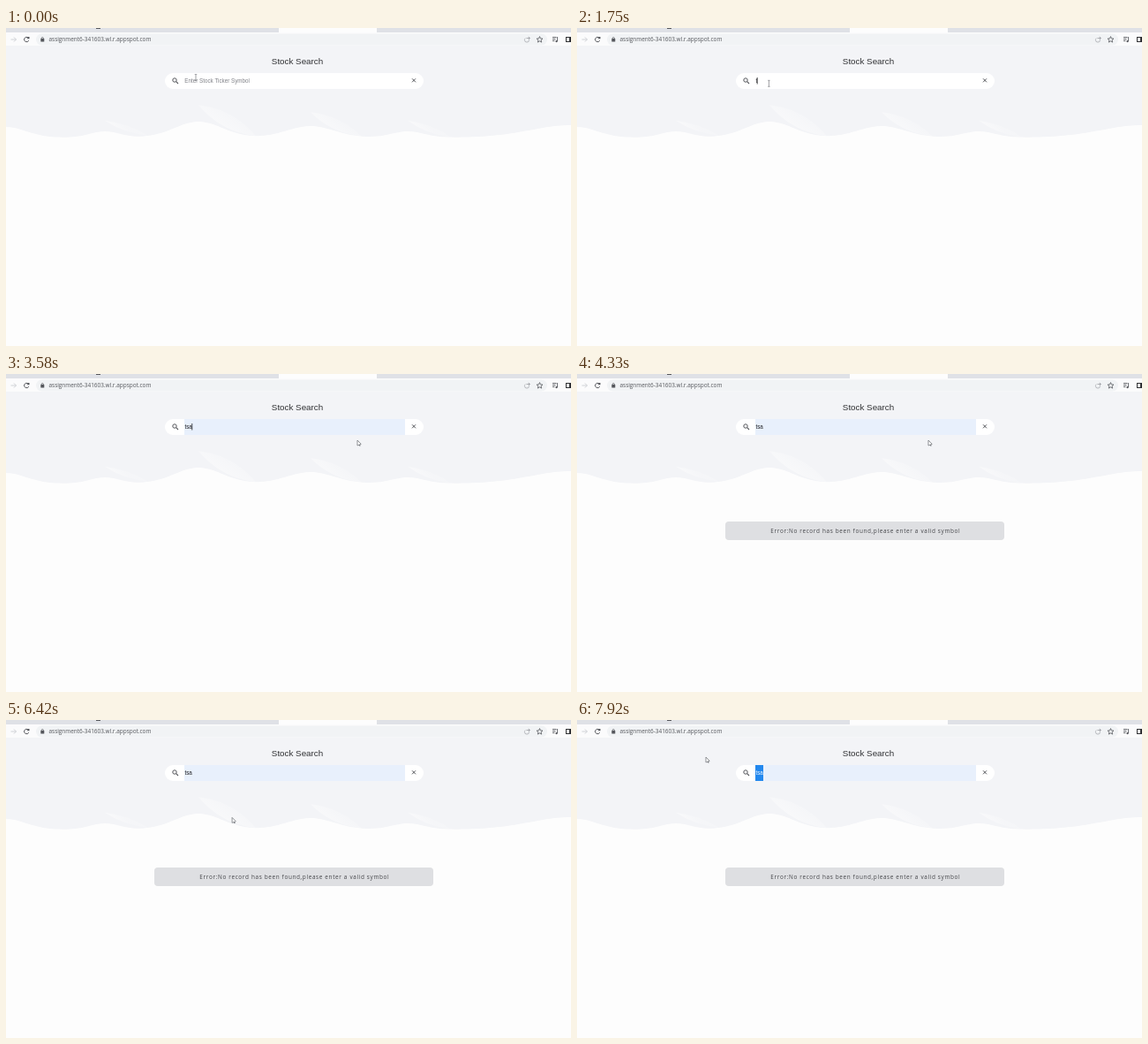
Animation of 640x360 px, one loop 8000 ms. Source, as an HTML page with a canvas:

```html
<!DOCTYPE html>
<html lang="en">
<head>
<meta charset="utf-8">
<title>Stock Search</title>
<style>
  html, body { margin: 0; width: 100%; height: 100%; overflow: hidden; background: #fdfdfd; }
  canvas { display: block; width: 640px; height: 360px; }
</style>
</head>
<body>
<canvas id="stage" width="640" height="360"></canvas>
<script>
const ctx = document.getElementById('stage').getContext('2d');
const LOOP = 8000;
const STEP = 250 / 3;
const ARIAL = '"Liberation Sans", Arial, sans-serif';
const HUMAN = '"Open Sans", "Noto Sans", sans-serif';
const PAGE = '#fdfdfd', HEADER = '#f3f4f7', INK = '#2f3033', GREY = '#55575c', FAINT = '#a9abb0';
const FIELD = { x: 202, y: 51, w: 250, h: 18 };

// Moments of the story, in ms
const TYPED = 1570, PICKED = 2240, FAILED = 4325, DRAGGED = 7420;

// The pointer rests between these moves
const MOVES = [
  { from: 80, to: 420, x: 218, y: 58 },
  { from: 1580, to: 2170, x: 215, y: 82 },
  { from: 2670, to: 3580, x: 398, y: 75 },
  { from: 4330, to: 5670, x: 272, y: 164 },
  { from: 5670, to: 7170, x: 240, y: 56 },
  { from: 7170, to: 7920, x: 146, y: 42 }
];

// Crests of the header wave
const CRESTS = [
  { x: 0, rise: 12, spread: 32 },
  { x: 112, rise: 7, spread: 24 },
  { x: 218, rise: 18, spread: 38 },
  { x: 345, rise: 13, spread: 38 },
  { x: 455, rise: 7, spread: 26 },
  { x: 640, rise: 14, spread: 65 }
];

function box(x, y, w, h, r, fill) {
  ctx.fillStyle = fill;
  ctx.beginPath();
  ctx.roundRect(x, y, w, h, r);
  ctx.fill();
}

function text(str, x, y, size, family, color, align = 'left', spacing = 0) {
  ctx.font = `${size}px ${family}`;
  ctx.letterSpacing = spacing + 'px';
  ctx.textAlign = align;
  ctx.fillStyle = color;
  ctx.fillText(str, x, y);
}

function line(x0, y0, x1, y1, color, width = 1) {
  ctx.strokeStyle = color;
  ctx.lineWidth = width;
  ctx.beginPath();
  ctx.moveTo(x0, y0);
  ctx.lineTo(x1, y1);
  ctx.stroke();
}

function ring(x, y, r, color, width = 1, from = 0, to = Math.PI * 2) {
  ctx.strokeStyle = color;
  ctx.lineWidth = width;
  ctx.beginPath();
  ctx.arc(x, y, r, from, to);
  ctx.stroke();
}

// Right-pointing arrow with its tip at x, y
function arrow(x, y, length, size, color) {
  line(x - length, y, x, y, color);
  line(x - size, y - size, x, y, color);
  line(x - size, y + size, x, y, color);
}

function star(x, y, r, color) {
  ctx.beginPath();
  for (let i = 0; i < 10; i++) {
    const d = i % 2 ? r * 0.45 : r, a = i * Math.PI / 5 - Math.PI / 2;
    ctx.lineTo(x + d * Math.cos(a), y + d * Math.sin(a));
  }
  ctx.closePath();
  ctx.strokeStyle = color;
  ctx.lineWidth = 0.8;
  ctx.stroke();
}

function edge(x) {
  return CRESTS.reduce((y, c) => y - c.rise * Math.exp(-(((x - c.x) / c.spread) ** 2)), 124);
}

function fold({ x, rise }) {
  const w = 38 + rise * 1.5, top = edge(x) - 8 - rise * 0.6, foot = edge(x + w);
  const g = ctx.createLinearGradient(x, foot, x + w * 0.35, top);
  g.addColorStop(0, 'rgba(253,253,253,0.9)');
  g.addColorStop(1, 'rgba(253,253,253,0.2)');
  ctx.fillStyle = g;
  ctx.beginPath();
  ctx.moveTo(x, top);
  ctx.quadraticCurveTo(x + w * 0.6, top + 4, x + w, foot);
  ctx.quadraticCurveTo(x + w * 0.4, foot - 4, x, top);
  ctx.fill();
}

function drawHeader() {
  ctx.fillStyle = HEADER;
  ctx.beginPath();
  ctx.moveTo(0, 0);
  for (let x = 0; x <= 640; x += 4) ctx.lineTo(x, edge(x));
  ctx.lineTo(640, 0);
  ctx.fill();
  CRESTS.slice(1, -1).forEach(fold);
}

function drawToolbar() {
  box(0, 0, 640, 5, 0, '#dfe1e6');
  box(309, 0, 111, 5, 0, PAGE);
  box(102, 0, 5, 1, 0, GREY);
  box(0, 5, 640, 15, 0, '#fbfbfc');
  box(34, 6.5, 579, 13, 6.5, '#f1f3f5');

  arrow(11.5, 13, 6, 2.5, '#d0d2d6');
  ring(23.3, 13, 2.7, GREY, 1, 0.4, 5.6);
  box(24.2, 10, 2.3, 2.3, 0, GREY);

  box(39.3, 12, 4, 3.6, 0.5, GREY);
  ring(41.3, 11.8, 1.2, GREY, 0.8, Math.PI, 0);
  text('assignment6-341603.wl.r.appspot.com', 48.5, 15.3, 6.43, HUMAN, GREY);

  ring(590, 13.5, 2.6, FAINT, 0.8, 0, 4);
  arrow(593.5, 11.5, 4, 1.7, FAINT);
  star(604.5, 13.2, 3.6, GREY);

  for (let i = 0; i < 3; i++) line(619, 10.5 + i * 2, 623.5 - i, 10.5 + i * 2, GREY, 0.9);
  line(624.6, 10, 624.6, 15, GREY, 0.9);
  box(622.4, 14, 2.4, 2.2, 1.1, GREY);

  box(634, 10, 6, 6, 0, INK);
  box(635, 11, 3, 4, 0, PAGE);
}

function drawSearch(t, px) {
  const value = t < TYPED ? '' : t < PICKED ? 't' : 'tsa';
  const selected = t > DRAGGED && px < 211;

  text('Stock Search', 330, 41.3, 9.8, ARIAL, INK, 'center');
  box(180, 51, 293, 18, 9, '#ffffff');
  if (t > PICKED) box(FIELD.x, FIELD.y, FIELD.w, FIELD.h, 0, '#e8f0fc');

  ring(191, 59, 2.2, GREY);
  line(192.7, 60.7, 195, 63, GREY, 1.1);
  for (const d of [-2, 2]) line(462 - d, 57.3, 462 + d, 61.3, GREY);

  if (!value) {
    text('Enter Stock Ticker Symbol', 202.3, 62, 6.28, ARIAL, '#808288');
    return;
  }
  if (selected) box(202, 51, 9, 18, 0, '#2388ee');
  text(value, 202.4, 62, 6.3, ARIAL, selected ? '#f4f8fd' : '#202124');

  const blink = (t + 793) / 1060 % 1;
  if (!selected && blink < 0.5) {
    box(202 + ctx.measureText(value).width, 56, 0.8, 7.5, 0, '#202124');
  }
}

function drawError() {
  box(168, 167, 316, 21, 4, '#dedfe2');
  text('Error:No record has been found,please enter a valid symbol',
    219.3, 180.3, 6.4, HUMAN, '#434448', 'left', 0.65);
}

function pointerAt(t) {
  let x = 215, y = 56;
  for (const m of MOVES) {
    const k = Math.min(1, Math.max(0, (t - m.from) / (m.to - m.from)));
    const ease = k * k * (3 - 2 * k);
    x += (m.x - x) * ease;
    y += (m.y - y) * ease;
  }
  return [x, y];
}

function drawPointer(x, y) {
  const over = x > FIELD.x && x < FIELD.x + FIELD.w && y > FIELD.y && y < FIELD.y + FIELD.h;
  if (over) {
    line(x, y - 3.5, x, y + 3.5, '#77797e', 0.7);
    for (const d of [-3.5, 3.5]) line(x - 1.3, y + d, x + 1.3, y + d, '#77797e', 0.6);
    return;
  }
  line(x + 1.8, y + 3.5, x + 3, y + 6.6, '#77797e', 1.4);
  ctx.beginPath();
  ctx.moveTo(x, y);
  ctx.lineTo(x, y + 6);
  ctx.lineTo(x + 4.2, y + 4.3);
  ctx.closePath();
  ctx.fillStyle = '#ffffff';
  ctx.fill();
  ctx.strokeStyle = '#77797e';
  ctx.lineWidth = 0.8;
  ctx.stroke();
}

function draw() {
  const now = performance.now() % LOOP;
  const t = Math.floor((now + 5) / STEP) * STEP % LOOP;
  const [x, y] = pointerAt(t);
  box(0, 0, 640, 360, 0, PAGE);
  drawHeader();
  drawToolbar();
  drawSearch(t, x);
  if (t > FAILED) drawError();
  drawPointer(x, y);
  requestAnimationFrame(draw);
}

draw();
</script>
</body>
</html>
```
